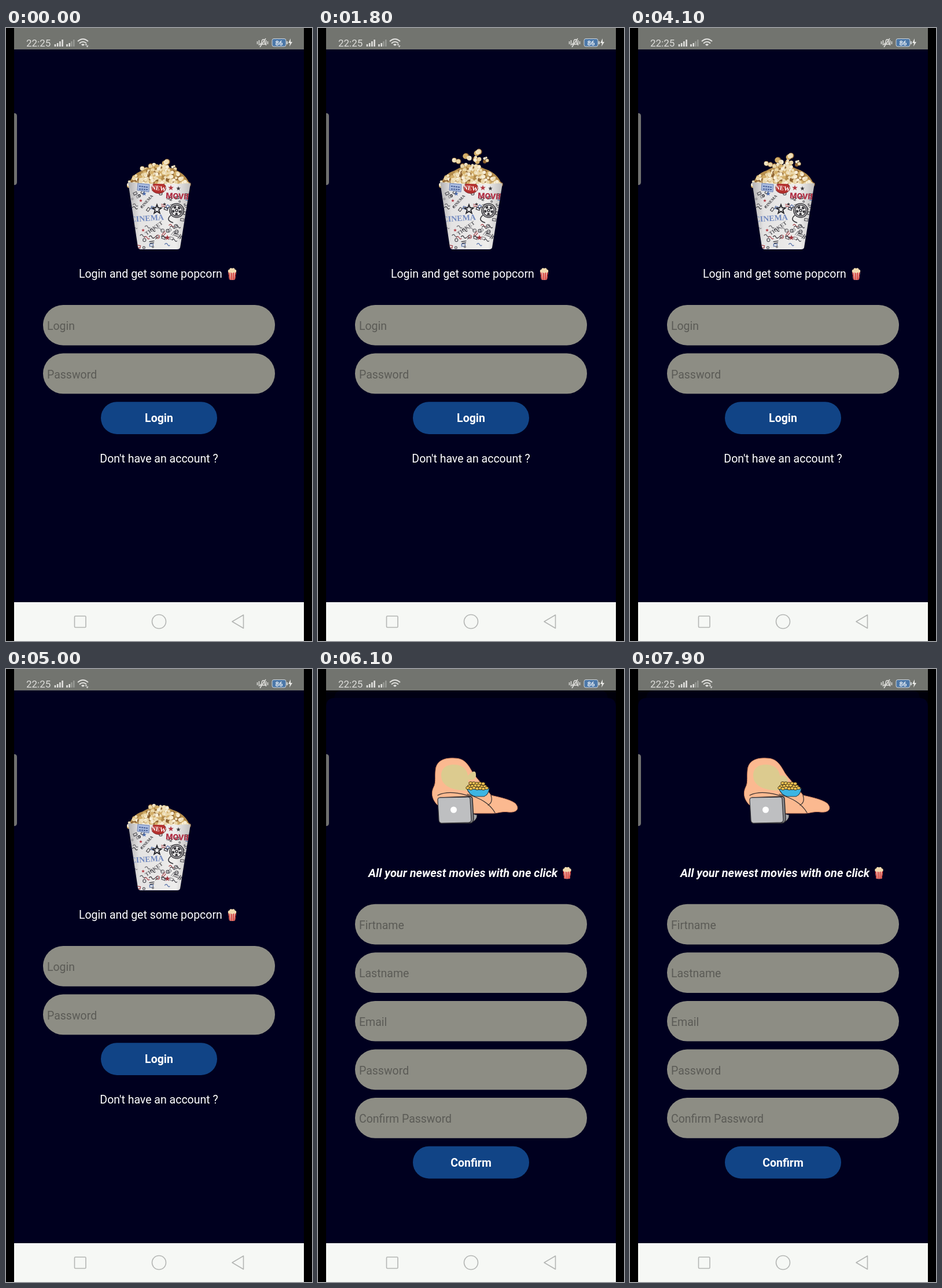
An HTML page that plays this animation: 529 by 1058 pixels, repeating every 8 s.

```html
<!DOCTYPE html>
<html lang="en">
<head>
<meta charset="utf-8">
<title>Popcorn login</title>
<style>
  html, body { margin: 0; width: 100%; height: 100%; overflow: hidden; background: #000; }
  svg { display: block; width: 100%; height: 100%; }
  text { font-family: Roboto, "Open Sans", sans-serif; font-size: 19.5px; fill: #fff; }
  .hint { fill: #5b5b56; }
  .mid { text-anchor: middle; }
  .bold { font-weight: 700; }
  .cup text { font-family: "Liberation Serif", serif; font-weight: 700; }
</style>
</head>
<body>
<svg viewBox="0 0 529 1058" xmlns="http://www.w3.org/2000/svg">
  <defs>
    <linearGradient id="paper">
      <stop offset="0" stop-color="#a9a7a8"/><stop offset=".2" stop-color="#e4e3e3"/>
      <stop offset=".75" stop-color="#eeedec"/><stop offset="1" stop-color="#b9b7b6"/>
    </linearGradient>
    <clipPath id="cupShape"><path d="M211 266Q265 271 319 268L301 379Q300 382 296 382H233Q229 382 228 378Z"/></clipPath>
    <clipPath id="bucketShape"><path d="M384 420H398L396 434Q391 436 386 434Z"/></clipPath>
    <g id="bucket">
      <g clip-path="url(#bucketShape)">
        <path fill="#f3e9df" d="M383 418H399V437H383Z"/>
        <path stroke="#d33c35" stroke-width="2.3" d="M385 419L387 437M389.3 419L389.7 437M393 419L392.6 437M397 419L395 437"/>
      </g>
      <g fill="#f2dcb0">
        <circle cx="386.5" cy="419.5" r="2.7"/><circle cx="395.5" cy="419.5" r="2.7"/>
        <circle cx="391" cy="420" r="3"/><circle cx="389" cy="416.8" r="2.6"/><circle cx="393" cy="416.8" r="2.5"/>
      </g>
    </g>
  </defs>

  <rect width="529" height="1058"/>
  <rect x="14" y="37" width="501" height="954" fill="#00001f"/>

  <g id="login">
    <g id="flying"></g>
    <g id="heap"></g>
    <g class="cup" clip-path="url(#cupShape)">
      <rect x="208" y="262" width="114" height="124" fill="url(#paper)"/>
      <g id="doodles" fill="none" stroke-width="1.2"></g>
      <g id="stars"></g>
      <g fill="none" stroke="#36353a" stroke-width="1.6">
        <circle cx="295" cy="315" r="12" fill="#e5e4e4"/><circle cx="295" cy="315" r="9.5"/>
        <circle cx="295" cy="315" r="2"/>
        <circle cx="295" cy="315" r="6" stroke-width="4" stroke-dasharray="4 3.5"/>
        <path d="M285 323Q275 332 289 336"/>
      </g>
      <path fill="#a9bbdf" stroke="#6d83b4" d="M228 268L248 270L247 283L227 280Z"/>
      <path stroke="#4d649c" stroke-width="2.2" stroke-dasharray="3 1" d="M230 273L246 275M230 278L245 279"/>
      <ellipse cx="264" cy="276" rx="12.5" ry="9.5" fill="#b5322f" stroke="#7d2528"/>
      <text class="mid" x="264" y="280" transform="rotate(8 264 276)" style="font-size:11px">NEW</text>
      <text x="276" y="294" transform="rotate(3 276 294)" style="font-size:14px;fill:#b02f45;font-family:Roboto,sans-serif;font-weight:900">MOVIE</text>
      <text x="215" y="335" transform="rotate(-4 215 335)" style="font-size:14px;fill:#7088bf">CINEMA</text>
      <text x="243" y="358" transform="rotate(-35 243 358)" style="font-size:9px;fill:#55545a">TICKET</text>
      <text x="235" y="312" transform="rotate(-48 235 312)" style="font-size:7px;fill:#38373c">CINEMA</text>
    </g>
    <text x="126" y="431">Login and get some popcorn</text>
    <use href="#bucket"/>
    <g id="loginForm"></g>
    <rect id="cursor" x="71" y="584" width="3" height="26" fill="#16807d"/>
    <text class="mid" x="264.5" y="749.5">Don't have an account ?</text>
  </g>

  <g id="register">
    <rect x="14" y="37" width="501" height="40" fill="#00000a"/>
    <path fill="#000013" d="M28 77V50Q29 37 42 37H487Q500 37 501 50V77Z"/>
    <path fill="#00001f" d="M14 991V64Q15 50 28 50H501Q514 50 515 64V991Z"/>
    <g id="scene" stroke-linejoin="round" stroke-linecap="round">
      <path fill="#fbb990" stroke="#d98760" d="M204 170C207 157 221 153 236 154C254 154 260 166 268 180C275 190 290 205 299 218C312 221 332 225 341 232C350 242 342 248 330 247C318 245 312 249 302 249H268L208 236C197 226 195 214 200 204C205 195 201 183 204 170Z"/>
      <path id="dog" fill="#dccb8f"/>
      <path fill="none" stroke="#302a2b" stroke-width="1.2" d="M258 216C280 223 296 231 306 248M299 218Q303 230 294 235M207 218Q227 208 264 220"/>
      <path fill="#3db5e3" stroke="#243d4a" stroke-width="1.2" d="M257 205Q276 211 296 206Q295 217 287 220H272Q261 218 257 205Z"/>
      <g id="snack" fill="#f2c453" stroke="#453616" stroke-width="1"></g>
      <path fill="#a9aaad" stroke="#343236" d="M267 250L275 252Q275 260 267 264Z"/>
      <path fill="#85868a" stroke="#29282b" stroke-width="1.4" d="M211 222L262 220Q267 220 267 224L269 259Q268 266 263 266H212Z"/>
      <path fill="#bebfc1" stroke="#343236" stroke-width="1.2" d="M211 222L259 221Q263 221 263 225L265 260Q265 265 260 265L213 266Q209 265 209 261L207 226Q207 222 211 222Z"/>
      <circle cx="234.5" cy="243" r="5.5" fill="#fff"/>
    </g>
    <text class="bold" x="87" y="358.5" font-style="italic" style="font-size:20px">All your newest movies with one click</text>
    <use href="#bucket" transform="translate(39.5 -72.5)"/>
    <g id="registerForm"></g>
  </g>

  <path fill="#70716f" d="M14 147Q19 147 19 152V266Q19 271 14 271Z"/>

  <g id="statusBar">
    <rect x="14" width="501" height="37" fill="#72746f"/>
    <text x="35" y="32" style="font-size:17px;fill:#dededb">22:25</text>
    <g stroke="#e0e0dd" stroke-width="2.6">
      <path d="M85 32V28M89.2 32V26M93.4 32V23M97.6 32V20M105.5 32V28M109.7 32V26"/>
      <path stroke="#979994" d="M113.4 32V23M117.3 32V20"/>
    </g>
    <g fill="none" stroke="#e0e0dd" stroke-width="2">
      <path d="M124 23Q133 15 142 23M127 26.5Q133 21 139 26.5"/>
      <path stroke-width="3" d="M131 29.5Q133 28 135 29.5"/>
    </g>
    <path id="wifiArrows" fill="#e0e0dd" stroke="#72746f" stroke-width=".6" d="M136 30L138.5 26L141 30ZM138 30L140.5 34L143 30Z"/>
    <g fill="none" stroke="#dededb" stroke-width="1.5">
      <path d="M434.5 23V28M437.5 21V30M449.5 21V30M452.5 23V28M439 29L442 25Q442 19 446 20L448 28H440M439 33L449 18"/>
    </g>
    <rect x="460" y="18.5" width="24" height="13.5" rx="3" fill="#4c78a9" stroke="#d0d5d8"/>
    <path stroke="#d0d5d8" stroke-width="2" d="M486 23V28"/>
    <text class="mid" x="472" y="29.5" style="font-size:11.5px;font-weight:500">86</text>
    <path fill="#e8e8e5" d="M492 18L488 26H491L490 32L495 24H492Z"/>
  </g>

  <rect x="14" y="991" width="501" height="67" fill="#f6f8f5"/>
  <g fill="none" stroke="#b4b6b4" stroke-width="1.6" stroke-linejoin="round">
    <rect x="118.5" y="1015" width="19.5" height="19.5" rx="1.5"/>
    <circle cx="264.5" cy="1024.5" r="12"/>
    <path d="M410.5 1013V1036L391 1024.5Z"/>
  </g>
</svg>

<script>
const LOOP = 8000;
const SCREEN_SWITCH = 5100;
// Kernels leap out together, fall back and then rest until the next leap.
const POP = { start: 1613, period: 2344, flight: 815 };
const $ = id => document.getElementById(id);

function add(parent, tag, attrs, text = "") {
  const node = document.createElementNS("http://www.w3.org/2000/svg", tag);
  for (const name in attrs) node.setAttribute(name, attrs[name]);
  node.textContent = text;
  parent.append(node);
  return node;
}

function seeded(seed) {
  return () => (seed = (seed * 16807) % 2147483647) / 2147483647;
}

const clamp = v => Math.min(1, Math.max(0, v));
const mod = (a, n) => ((a % n) + n) % n;

function addForm(parent, top, labels, action) {
  labels.forEach((label, i) => {
    const y = top + i * 83.6;
    add(parent, "rect", { x: 64, y, width: 401, height: 69.7, rx: 34.8, fill: "#8d8d84" });
    add(parent, "text", { x: 71, y: y + 43, class: "hint" }, label);
  });
  const y = top + labels.length * 83.6;
  add(parent, "rect", { x: 164, y, width: 201, height: 55.7, rx: 27.8, fill: "#114486" });
  add(parent, "text", { x: 264.5, y: y + 35, class: "mid bold" }, action);
}

function addKernel(parent, x, y, size, random) {
  const kernel = add(parent, "g", { transform: `translate(${x} ${y})` });
  const tones = ["#8f6330", "#d3ae69", "#ead6a8", "#f7eed8", "#efdfb9"];
  tones.forEach((fill, i) => {
    const angle = random() * 2 * Math.PI;
    const reach = size * .55;
    add(kernel, "circle", {
      cx: Math.cos(angle) * reach, cy: Math.sin(angle) * reach * .8 + 1.5 - i * .7,
      r: size * (.65 - i * .07), fill
    });
  });
  return kernel;
}

function buildHeap() {
  const random = seeded(73);
  add($("heap"), "path", { fill: "#b58d4c", d: "M212 271Q217 252 236 246Q262 230 288 243Q311 250 318 271Z" });
  for (let row = 0; row < 5; row++) {
    const y = 240 + row * 7;
    const half = 11 + 9.5 * row;
    const count = 3 + row * 2;
    for (let i = 0; i < count; i++) {
      const x = 264 + half * (2 * i / (count - 1) - 1);
      addKernel($("heap"), x, y + random() * 4 - 2, 6.5, random);
    }
  }
}

function starPath(x, y, r) {
  let d = "";
  for (let i = 0; i < 10; i++) {
    const a = i * Math.PI / 5 - Math.PI / 2;
    const reach = i % 2 ? r * .42 : r;
    d += `${i ? "L" : "M"}${x + reach * Math.cos(a)} ${y + reach * Math.sin(a)}`;
  }
  return d + "Z";
}

function buildDoodles() {
  const random = seeded(419);
  const inks = ["#4a494e", "#6b6a6f", "#313036", "#55545a", "#8d8c90", "#a84349", "#5670a8"];
  for (let i = 0; i < 72; i++) {
    const x = 218 + random() * 96, y = 284 + random() * 96;
    if (y > 320 && y < 337 && x < 268) continue;
    const stroke = inks[Math.floor(random() * inks.length)];
    const turn = `rotate(${-60 + random() * 80} ${x} ${y})`;
    if (i % 4 === 0) add($("doodles"), "circle", { cx: x, cy: y, r: 1 + random() * 2, stroke });
    else if (i % 4 === 1) add($("doodles"), "path", { d: `M${x} ${y}h9m-8 3h7`, stroke, transform: turn });
    else if (i % 4 === 2) add($("doodles"), "rect", { x, y, width: 6, height: 4, stroke, transform: turn });
    else add($("doodles"), "path", { d: `M${x} ${y}q3-4 5 0t4 1`, stroke });
  }
  [[261, 313, 8, "#eee", "#29282d"], [285, 276, 5, "#b23a42"], [298, 277, 4, "#38373c"],
   [239, 286, 4, "#4a69ab"], [233, 298, 3, "#b23a42"], [279, 362, 5, "#9f343d"],
   [274, 304, 3, "#38373c"], [237, 349, 3, "#b23a42"]].forEach(([x, y, r, fill, stroke = "none"]) =>
    add($("stars"), "path", { d: starPath(x, y, r), fill, stroke, "stroke-width": 2 }));
}

function buildSnack() {
  const random = seeded(31);
  for (let row = 0; row < 3; row++) {
    for (let i = 0; i < 5 + row; i++) {
      add($("snack"), "ellipse", {
        cx: 264 - row * 2.5 + i * 5.4, cy: 197 + row * 4 + random() * 2, rx: 3.3, ry: 2.5
      });
    }
  }
}

addForm($("loginForm"), 478, ["Login", "Password"], "Login");
addForm($("registerForm"), 405.7, ["Firtname", "Lastname", "Email", "Password", "Confirm Password"], "Confirm");
buildHeap();
buildDoodles();
buildSnack();

const kernelRandom = seeded(12);
const kernels = [
  { x: 239, rest: 256, lift: 41, size: 7 },
  { x: 259, rest: 255, lift: 50, size: 8 },
  { x: 275, rest: 256, lift: 44, size: 7 },
  { x: 290, rest: 255, lift: 42, size: 5 },
  { x: 274, rest: 245, lift: 50, size: 8 }
].map(k => ({ ...k, node: addKernel($("flying"), k.x, k.rest, k.size, kernelRandom) }));

function drawPopcorn(t) {
  const progress = clamp(mod(t - POP.start, POP.period) / POP.flight);
  const height = Math.sin(Math.PI * progress);
  for (const { x, rest, lift, node } of kernels) {
    node.setAttribute("transform", `translate(${x} ${rest - lift * height})`);
  }
}

function drawScene(t) {
  const raise = clamp(2 * Math.cos((t - 6100) / 1200 * 2 * Math.PI));
  const paw = 202 - 13 * raise;
  $("scene").setAttribute("opacity", clamp((t - 5130) / 300));
  $("dog").setAttribute("d",
    `M213 184C213 171 222 165 235 165C250 165 258 174 259 184Q274 ${paw - 20} 273 ${paw - 4}` +
    `Q271 ${paw + 4} 260 ${paw + 2}L260 209C245 211 213 207 213 184Z`);
}

function draw(t) {
  const registering = t >= SCREEN_SWITCH;
  $("login").style.display = registering ? "none" : "";
  $("register").style.display = registering ? "" : "none";
  $("cursor").style.display = mod(t - 2300, 1000) < 500 ? "" : "none";
  $("wifiArrows").style.display = t > 3500 && t < 7000 && mod(t, 2000) < 400 ? "none" : "";
  drawPopcorn(t);
  drawScene(t);
}

const start = performance.now();
function tick() {
  draw((performance.now() - start) % LOOP);
  requestAnimationFrame(tick);
}
tick();
</script>
</body>
</html>
```
